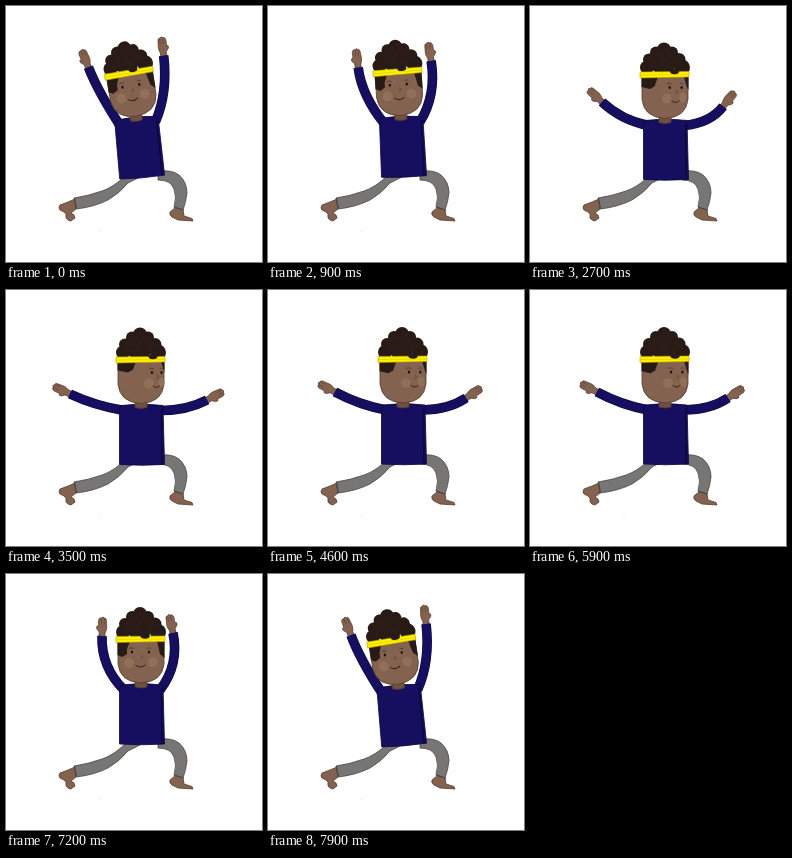
Write an HTML page with a canvas that moves like this. It is 256 px wide and 256 px high and loops after 8 s.

```html
<!DOCTYPE html>
<html lang="en">
<head>
<meta charset="utf-8">
<title>Stretching</title>
<style>
html, body { margin: 0; width: 100%; height: 100%; overflow: hidden; background: #fff; }
canvas { display: block; width: 100vw; height: 100vh; }
</style>
</head>
<body>
<canvas id="stage"></canvas>
<script>
const canvas = document.getElementById('stage');
const g = canvas.getContext('2d');
const LOOP = 8000, STEP = 100;
const SKIN = '#83624f', SKIN_DARK = '#573c30', CHEEK = '#917059', HAIR = '#281a15';
const NAVY = '#160f60', NAVY_DARK = '#0b0740', GREY = '#787675', GREY_DARK = '#494746';

// lean, drop, turn, then left elbow, left wrist, right elbow, right wrist
const POSE = {
  lean:  [-5, 1, 0,     102, 84, 92, 57,  165, 87,  168, 52],
  up:    [0, 0, 0,      101, 91, 96, 62,  167, 89,  167, 59],
  mid:   [0, 2, .55,    96, 104, 85, 79,  173, 103, 180, 79],
  out:   [0, 4, .75,    92, 113, 67, 102, 178, 117, 198, 108],
  reach: [0, 4.5, 1,    90, 114, 64, 104, 179, 118, 201, 110],
  wide:  [0, 4.5, .85,  88, 115.5, 61, 106, 181, 118, 205, 111]
};
const KEYS = [
  [0, 'lean'], [300, 'lean'], [1400, 'up'], [2000, 'up'], [2450, 'mid'], [2850, 'out'],
  [3550, 'reach'], [4600, 'out'], [5350, 'wide'], [5900, 'out'], [6150, 'out'],
  [6700, 'mid'], [7200, 'up']
];

function key(i) {
  const n = KEYS.length, lap = Math.floor(i / n), k = KEYS[i - lap * n];
  return { t: k[0] + lap * LOOP, v: POSE[k[1]] };
}

function slope(a, b, j) { return (b.v[j] - a.v[j]) / (b.t - a.t); }

// Harmonic mean keeps the curve free of overshoot
function tangent(p, q) { return p * q <= 0 ? 0 : 2 * p * q / (p + q); }

function poseAt(t) {
  let i = KEYS.length - 1;
  while (KEYS[i][0] > t) i--;
  const a = key(i - 1), b = key(i), c = key(i + 1), d = key(i + 2);
  const h = c.t - b.t, u = (t - b.t) / h, u2 = u * u, u3 = u2 * u;
  return b.v.map((v, j) => {
    const s = slope(b, c, j);
    const m0 = tangent(slope(a, b, j), s) * h, m1 = tangent(s, slope(c, d, j)) * h;
    return v * (2 * u3 - 3 * u2 + 1) + c.v[j] * (3 * u2 - 2 * u3)
      + m0 * (u3 - 2 * u2 + u) + m1 * (u3 - u2);
  });
}

function paint(path, fill, line, width = .8) {
  const p = typeof path === 'string' ? new Path2D(path) : path;
  if (fill) { g.fillStyle = fill; g.fill(p); }
  if (line) { g.strokeStyle = line; g.lineWidth = width; g.stroke(p); }
}

function oval(x, y, rx, ry, fill, line) {
  const p = new Path2D();
  p.ellipse(x, y, rx, ry, 0, 0, Math.PI * 2);
  paint(p, fill, line);
}

function turnAbout(x, y, degrees) {
  g.translate(x, y);
  g.rotate(degrees * Math.PI / 180);
  g.translate(-x, -y);
}

function legs() {
  paint('M69 193 L62 196 L54 199 Q52 202 54 204 L58 206 L60 208 L60 212 Q62 215 65 215 L69 212 L68 209 L65 207 L70 203Z', SKIN, SKIN_DARK);
  paint('M120 169 Q108 181 96 185 Q82 190 68 192 L70 203 Q88 201 102 194 Q114 187 122 177 L134 171Z', GREY, GREY_DARK);
  paint('M68.5 192 L70.5 203', null, GREY_DARK, 1.2);
  paint('M170 201 L164 206 Q163 209 166 211 L172 214 L187 215 L186 212.5 L178 210 L177 203Z', SKIN, SKIN_DARK);
  paint('M152 165 Q166 163.5 173 169 Q181 176 181 187 Q180 196 177 204 L168 201 Q171 191 168 183 Q165 174 152 174Z', GREY, GREY_DARK);
  paint('M168 201 L177 204', null, GREY_DARK, 1.2);
  oval(94, 225, .8, .5, '#dedede');
}

function hand(x, y, angle, side) {
  g.save();
  g.translate(x, y);
  g.rotate(angle);
  g.scale(1, side);
  paint('M-2 -3 L4 -3 L7 -5.5 Q10 -6.5 10 -4 L16 -4 Q19 -3 18 -1 Q20 0 18 2 Q18 4 15 4 L8 4.5 Q5 4 3 3 L-2 3Z', SKIN, SKIN_DARK, .7);
  paint('M12 -1 L18 -1 M12 2 L17 2', null, SKIN_DARK, .5);
  g.restore();
}

function arm(sx, sy, ex, ey, wx, wy, side) {
  const cx = 2 * ex - (sx + wx) / 2, cy = 2 * ey - (sy + wy) / 2;
  hand(wx, wy, Math.atan2(wy - cy, wx - cx), side);
  const p = new Path2D();
  p.moveTo(sx, sy);
  p.quadraticCurveTo(cx, cy, wx, wy);
  paint(p, null, NAVY_DARK, 9.6);
  paint(p, null, NAVY, 8.4);
}

function torso(drop) {
  g.save();
  g.translate(0, drop);
  paint('M115 111 Q136 108 157 111 L158.5 170 Q136 171.5 113.5 170 L113.5 114Z', NAVY, NAVY_DARK);
  paint('M155.5 114 L156 170', null, NAVY_DARK, 1.4);
  g.restore();
}

function hair() {
  const curls = [[134, 40, 7], [126, 43, 6], [142, 43, 6], [119, 50, 6], [149, 50, 6.5],
    [133, 51, 14], [117, 58, 7], [152, 58, 8], [134, 58, 10]];
  for (const [x, y, r] of curls) oval(x, y, r, r, HAIR);
  for (let i = 0; i < 26; i++) {
    const a = i * 2.4, r = Math.sqrt(i / 26);
    oval(134 + 17 * r * Math.cos(a), 50 + 12 * r * Math.sin(a), 1.7, 1.4, null, '#30211b');
  }
}

function head(drop, turn, tilt) {
  g.save();
  g.translate(0, drop);
  paint('M129 104 L129 113 Q135 115 141 113 L141 104Z', '#70503f', SKIN_DARK);
  turnAbout(135, 104, tilt);
  paint('M112 66 L112 90 Q114 108 135 109 Q156 108 158 90 L158 66Z', SKIN, SKIN_DARK);
  const l = 121 + 6 * turn, r = 153 + 4 * turn, low = 83 - 5 * turn;
  const a = 126 + 20 * turn, b = 143 + 12.5 * turn, m = 134.5 + 16 * turn;
  oval(a - 3, 89, 5, 5, CHEEK);
  oval(b + 4 - 4 * turn, 88, 5 - 2 * turn, 5, CHEEK);
  paint(`M111.5 66 L111.5 ${low - 2} L${l - 5} ${low} L${l} ${low - 3} L${l} 75 L${l + 3} 67Z`, HAIR);
  paint(`M158.5 66 L158.5 ${84 - 5 * turn} L${r + 1} ${80 - 4 * turn} L${r - 2} 67Z`, HAIR);
  oval(a, 78, 1.1, 1.5, '#17100d');
  oval(b, 78, 1.1, 1.5, '#17100d');
  paint(`M${a - 3} 74.5 q2.5 -1.5 5 0 M${b - 2} 74.5 q2 -1.5 4 0`, null, '#4a3027', .7);
  paint(`M${m + 1} 81 q2 3 -1 3.5`, null, SKIN_DARK, .8);
  const w = 5 - 1.5 * turn;
  paint(`M${m - w} 91 q${w} 4 ${2 * w} 0`, null, '#38211b', 1);
  hair();
  paint('M110 62.5 L159 62 L159 67.5 L110 68.5Z', '#fff000', '#b8a400', .6);
  paint('M110 65.5 L158.5 65', null, '#d9c800', .6);
  oval(139 + 8 * turn, 62.3, 4.5, 2.4, HAIR);
  g.restore();
}

function draw(t) {
  const [lean, drop, turn, lex, ley, lwx, lwy, rex, rey, rwx, rwy] = poseAt(t);
  const w = Math.round(innerWidth * (devicePixelRatio || 1));
  const h = Math.round(innerHeight * (devicePixelRatio || 1));
  if (canvas.width !== w || canvas.height !== h) {
    canvas.width = w;
    canvas.height = h;
  }
  g.setTransform(1, 0, 0, 1, 0, 0);
  g.fillStyle = '#fff';
  g.fillRect(0, 0, w, h);
  g.scale(w / 256, h / 256);
  g.lineJoin = 'round';
  legs();
  turnAbout(137, 169, lean);
  arm(118, 116 + drop, lex, ley, lwx, lwy, 1);
  arm(154, 116 + drop, rex, rey, rwx, rwy, -1);
  torso(drop);
  head(drop, turn, lean * .8);
}

const start = performance.now();
function frame() {
  const t = (performance.now() - start) % LOOP;
  draw(Math.floor(t / STEP) * STEP);
  requestAnimationFrame(frame);
}
frame();
</script>
</body>
</html>
```
